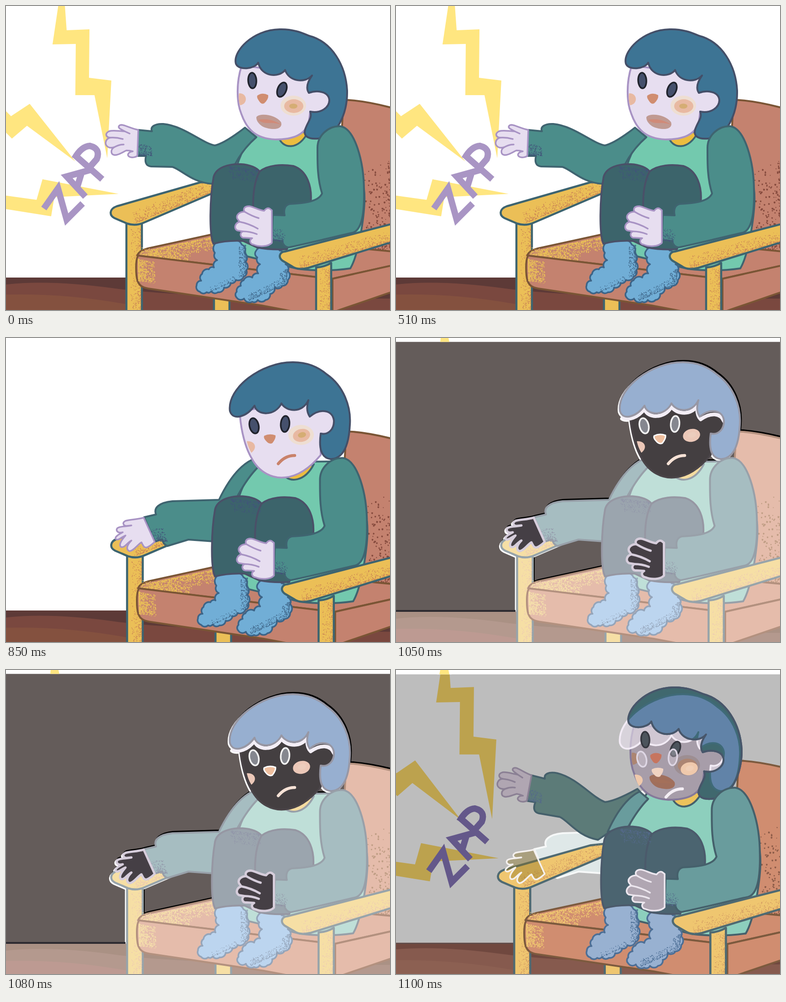
An HTML page that plays this animation: 842x665 px, repeating every 1.15 s.

```html
<!DOCTYPE html>
<html lang="en">
<head>
<meta charset="utf-8">
<title>Static shock</title>
<style>
html, body { margin: 0; width: 100%; height: 100%; overflow: hidden; background: #fff; }
svg { display: block; width: 842px; height: 665px; }
path, ellipse { stroke-linejoin: round; stroke-linecap: round; }

.plain {
  --floor: #7a483f; --band: #5d3a37; --grain: #84513f; --rust: #c4826f; --rustL: #7a5535;
  --wood: #ebbf57; --woodL: #3d6470; --mint: #73c9ae; --sleeve: #4b8d8a; --arm: #4b8d8a; --line: #3f6470;
  --knee: #3c646b; --kneeL: #4a5068; --sock: #71aed6; --sockL: #3d6487; --hair: #3d7494; --hairL: #444f68;
  --skin: #e7def0; --palm: #e7def0; --skinL: #a893c4; --palmL: #a893c4; --eye: #45506c; --eyeL: #20232c;
  --nose: #d08d70; --noseL: none; --cheek: #e8b9a2; --spot: #d5ad74; --halo: #f6dfb6;
  --mouth: #c09a92; --lip: #d08a78; --frown: #c9826a; --collar: #ecbc3f; --rim: none;
  --sw: #c98254; --sr: #eac057; --sb: #84493c; --sl: #41547a; --bolt: #ffe680; --zap: #a995c4;
}
.flash {
  --floor: #b4998e; --band: #aa9184; --grain: #bd9a92; --rust: #e5bcab; --rustL: #b3917f;
  --wood: #f6dfa5; --woodL: #98a4aa; --mint: #bfdfd8; --sleeve: #a6bdc1; --arm: #a6bdc1; --line: #98a0a9;
  --knee: #9ba5ae; --kneeL: #9697a3; --sock: #bcd5ef; --sockL: #95a5ba; --hair: #97afd0; --hairL: #9797a4;
  --skin: #443f41; --palm: #453f45; --skinL: #4a4448; --palmL: #d6cddb; --palmW: 5px; --eye: #85878f; --eyeL: #f2f2f2;
  --nose: #efbf9f; --noseL: #fff; --cheek: #ecc8b8; --spot: #eccdbd; --halo: none;
  --frown: #f7e2d6; --collar: #f5dca0; --rim: #f3eef6;
  --sw: #ecc9b2; --sr: #f5dfab; --sb: #bf9d84; --sl: #9297a9;
}
.mix {
  --floor: #865a4e; --band: #70483f; --grain: #8c6052; --rust: #d08d70; --rustL: #7c5a3e;
  --wood: #efc670; --woodL: #4f6a72; --mint: #8dcfbd; --sleeve: #699c9d; --arm: #5c7b78; --line: #45606b;
  --knee: #4b6470; --kneeL: #4b5a6b; --sock: #98b1d1; --sockL: #4d6f96; --hair: #40686e; --hairL: #47566a;
  --skin: #a79da9; --palm: #b0a6b2; --skinL: #85799a; --palmL: #8b8094; --eye: #4c545c; --eyeL: #35373f;
  --nose: #c6755f; --noseL: none; --cheek: #ac8572; --spot: #ac8572; --halo: #94807c;
  --mouth: #a06f5c; --lip: #a4705a; --collar: #ecc25c; --rim: none;
  --sw: #d29a62; --sr: #efc670; --sb: #8a5a47; --sl: #54698a; --bolt: #bca24e; --zap: #64588a;
}
.ghost {
  --eye: #ddd5e055; --eyeL: #ded6e4; --nose: #f0d3c2; --noseL: none; --palm: #8a701f66; --palmL: #f4f0ee;
  --cheek: #efc9ac; --spot: #f0cfb6; --halo: none; --frown: #f4eef4; --arm: #dfe8e8; --line: #f6f8f8;
}
.black { filter: brightness(0); }
.white { filter: brightness(0) invert(1); }

.floor { fill: var(--floor); } .band { fill: var(--band); } .grain { fill: var(--grain); }
.rust { fill: var(--rust); stroke: var(--rustL); stroke-width: 4; }
.wood { fill: var(--wood); stroke: var(--woodL); stroke-width: 4.5; }
.mint { fill: var(--mint); stroke: var(--line); stroke-width: 4; }
.sleeve { fill: var(--sleeve); stroke: var(--line); stroke-width: 4; }
.arm { fill: var(--arm); stroke: var(--line); stroke-width: 4; }
.knee { fill: var(--knee); stroke: var(--kneeL); stroke-width: 4; }
.sock { fill: var(--sock); stroke: var(--sockL); stroke-width: 3.5; }
.hair { fill: var(--hair); stroke: var(--hairL); stroke-width: 4; }
.face { fill: var(--skin); stroke: var(--skinL); stroke-width: 4; }
.palm { fill: var(--palm); stroke: var(--palmL); stroke-width: var(--palmW, 3.5px); }
.eye { fill: var(--eye); stroke: var(--eyeL); stroke-width: 3.5; }
.nose { fill: var(--nose); stroke: var(--noseL); stroke-width: 3; }
.cheek { fill: var(--cheek); } .spot { fill: var(--spot); } .halo { fill: var(--halo); opacity: .5; }
.mouth { fill: var(--mouth); } .lip { fill: var(--lip); }
.frown { fill: none; stroke: var(--frown); stroke-width: 6.5; }
.collar { fill: var(--collar); stroke: var(--line); stroke-width: 4; }
.rim { fill: none; stroke: var(--rim); stroke-width: 8; }
.sw { fill: var(--sw); } .sr { fill: var(--sr); } .sb { fill: var(--sb); }
.sl { fill: var(--sl); } .sk { fill: var(--sockL); }
.bolt { fill: var(--bolt); }
.zap { fill: none; stroke: var(--zap); stroke-width: 14; }
.zap path { stroke-linecap: butt; stroke-linejoin: miter; }
.inner { fill: none; }
</style>
</head>
<body>
<svg viewBox="0 0 842 665" role="img" aria-label="ZAP">
<defs>
  <g id="floor">
    <path class="floor" d="M-20 594H880V700H-20Z"/>
    <path class="band" d="M-20 594H880V640Q400 640 240 618T-20 612Z"/>
    <path class="grain" d="M-20 632Q120 626 262 652L300 700H-20Z"/>
  </g>

  <g id="back">
    <path class="rust" d="M740 205Q795 207 880 232V575H720Z"/>
    <path class="sb" data-spray="842,335,842,530,-56,30,170,3.2"/>
    <path class="sb" data-spray="842,548,768,562,0,-30,90,3"/>
  </g>

  <g id="chair">
    <path class="wood" d="M264 470H298V690H264ZM456 630H490V690H456Z"/>
    <path class="sw" data-spray="295,486,295,665,-22,0,330,1.6"/>
    <path class="wood" d="M243 438L425 386L480 380V398L302 474Q284 482 266 476L238 464C226 458 226 444 243 438Z"/>
    <path class="sw" data-spray="280,475,452,406,-4,-26,600,1.6"/>
    <path class="rust" d="M288 546C290 538 300 533 312 530L450 500L880 540V560L714 597Z"/>
    <path class="sr" data-spray="306,535,452,504,14,25,800,2"/>
    <path class="sr" data-spray="292,542,400,556,6,-14,260,2"/>
    <path class="rust" d="M290 546C283 555 285 590 288 600C292 612 300 616 312 618L560 655L640 670H716L880 614V560L714 597Z"/>
    <path class="rust inner" d="M716 597V680"/>
    <path class="sr" data-spray="289,552,290,600,36,7,520,2"/>
    <path class="mint" d="M548 272C520 310 490 350 480 520L530 548L640 575Q700 582 755 574C775 540 790 440 785 400L735 270Z"/>
  </g>

  <g id="front">
    <path class="sock" data-scallop="462,517 490,514 517,522 523,540 525,560 527,578 521,592 504,599 493,606 478,616 465,626 450,624 440,626 425,625 418,611 428,601 430,586 445,576 456,572 463,556 458,540"/>
    <path class="sk" data-spray="525,522,526,588,-16,5,220,1.7"/>
    <path class="sk" data-spray="448,624,506,598,-4,-9,70,1.6"/>
    <path class="sock" data-scallop="548,536 575,530 600,535 611,548 613,565 618,580 618,599 606,612 589,616 579,630 569,643 552,643 540,647 522,640 506,638 506,625 515,612 521,600 540,594 553,585 557,565 551,550"/>
    <path class="sk" data-spray="617,574,614,606,-16,5,100,1.7"/>
    <path class="sk" data-spray="532,644,604,611,-5,-13,180,1.7"/>
    <path class="knee" d="M455 520C445 500 447 420 455 375C460 352 490 345 515 346C535 347 550 354 556 362C575 347 605 346 630 350C660 360 672 395 668 432L660 440L616 532Q580 534 550 528L520 514Q485 512 455 520Z"/>
    <path class="knee inner" style="fill:none" d="M556 362Q541 390 542 440"/>
    <path class="sl" data-spray="488,350,552,358,2,28,260,1.6"/>
    <path class="sleeve" d="M683 310C683 285 705 262 733 263C765 268 785 340 785 405C786 455 780 490 760 496C715 506 660 520 620 528C612 528 606 520 606 514L583 512L585 457L611 458C608 445 612 435 622 433C645 432 685 430 693 410C682 375 683 340 683 310Z"/>
    <path class="sl" data-spray="586,511,612,516,-1,-26,110,1.6"/>
    <path class="palm" d="M583 447L578 443Q572 440 566 448C552 446 545 440 534 438C524 437 519 443 523 450C512 450 504 457 507 465L512 472C502 475 499 486 507 491L519 493C511 498 514 508 524 507L540 508C532 512 535 521 543 522C555 527 575 527 583 518Z"/>
    <path class="palm inner" d="M523 450Q540 460 554 464M512 472Q533 476 552 487M519 493Q535 493 550 499"/>
    <path class="wood" d="M612 537L880 468V506L662 573Q640 578 628 570L606 557C596 549 600 538 612 537Z"/>
    <path class="sw" data-spray="645,572,842,514,-4,-24,560,1.6"/>
    <path class="wood" d="M680 690V572Q698 571 713 562V690Z"/>
    <path class="sw" data-spray="710,572,710,665,-22,0,180,1.6"/>
  </g>

  <g id="armUp">
    <path class="arm" d="M524 266Q480 300 458 305C430 300 390 262 345 258C325 257 316 265 320 274L289 271L288 328L307 328C304 340 306 350 318 351L365 352C385 358 410 388 455 389L503 345Q520 312 549 287Z"/>
    <path class="sl" data-spray="291,325,320,327,-1,-24,170,1.6"/>
    <path class="palm" d="M290 271C275 268 262 261 254 260C246 260 245 266 251 269L260 274C248 274 235 271 226 274C216 279 219 287 228 288C217 291 215 305 225 309Q229 311 237 309C229 314 229 325 238 326C246 327 255 320 264 316Q272 316 278 318C268 319 264 327 271 330C277 333 285 330 288 328Z"/>
    <path class="palm inner" d="M260 274L271 279M228 288Q242 287 256 291M237 309Q248 303 258 303"/>
  </g>
  <path id="sleeveDown" class="arm" d="M540 266Q500 285 467 354L365 357C335 360 323 372 329 386L303 392L326 446L342 440Q345 452 354 455L400 441L470 446L508 345Q530 305 553 282Z"/>
  <path id="handDown" class="palm" d="M302 393C288 397 272 397 262 400C254 404 257 411 265 411L275 410C262 413 250 411 244 416C240 422 246 428 256 425C246 430 237 436 241 440C246 444 252 436 262 432C255 440 246 452 252 457C260 460 265 448 275 443C266 452 262 462 270 466C278 468 288 452 297 447C300 452 302 460 309 458C316 455 322 450 326 446Z"/>
  <g id="armDown">
    <use href="#sleeveDown"/>
    <path class="sl" data-spray="326,444,354,444,-10,-28,150,1.6"/>
    <use href="#handDown"/>
  </g>

  <g id="faceA">
    <path class="collar" d="M597 285C605 313 642 318 663 274Z"/>
    <path class="face" d="M517 130C505 165 505 210 516 236C528 270 548 290 590 292C630 292 655 282 664 255L667 231C690 236 709 222 709 206C708 188 685 183 664 190L672 150Z"/>
  </g>
  <path id="hairA" class="hair" d="M504 126C497 100 540 52 600 51C630 50 652 60 664 65C715 78 745 130 748 185C749 235 725 290 684 290C660 292 652 283 656 270C662 252 672 245 667 231C690 236 709 222 709 206C708 188 685 183 664 190C656 178 664 162 671 152C655 170 620 165 612 140C598 158 560 155 553 124C545 138 510 142 504 126Z"/>
  <g id="featA">
    <ellipse class="halo" cx="630" cy="218" rx="28" ry="22"/>
    <ellipse class="cheek" cx="631" cy="219" rx="21" ry="15"/>
    <ellipse class="spot" cx="630" cy="219" rx="9" ry="5.5"/>
    <path class="cheek" d="M511 191C530 190 531 215 513 217Q509 204 511 191Z"/>
    <ellipse class="eye" cx="540" cy="163" rx="9" ry="17" transform="rotate(-3 540 163)"/>
    <ellipse class="eye" cx="605" cy="183" rx="9.5" ry="16.5" transform="rotate(22 605 183)"/>
    <path class="nose" d="M551 196Q562 188 575 195Q576 204 566 213Q560 216 555 208Q549 200 551 196Z"/>
    <path class="mouth" d="M549 243C555 234 590 236 603 254C608 268 590 272 572 267C560 265 548 253 549 243Z"/>
    <path class="lip" d="M553 249Q580 244 604 260Q590 255 576 256T553 249Z"/>
  </g>

  <g id="faceB">
    <path class="collar" d="M608 299C622 317 655 315 675 276Z"/>
    <path class="face" d="M513 170C516 205 525 240 538 262C555 295 585 308 612 305C645 302 670 280 690 256V209C708 213 720 198 719 180C716 158 690 152 666 172L663 136L515 160Z"/>
    <path class="rim" d="M719 182C712 164 690 162 668 178Q658 168 661 146C650 170 615 168 604 150C590 178 550 176 545 155C530 176 508 180 498 174"/>
  </g>
  <path id="hairB" class="hair" d="M491 160C484 110 560 52 630 53C665 53 690 68 704 80C740 105 757 150 754 190C752 230 742 264 712 265C690 262 686 240 690 209C708 213 720 198 719 180C716 158 690 152 666 172C658 160 660 148 663 136C650 165 615 162 604 143C590 172 550 170 545 148C528 172 498 182 491 160Z"/>
  <g id="featB">
    <ellipse class="halo" cx="647" cy="212" rx="28" ry="22"/>
    <ellipse class="cheek" cx="648" cy="213" rx="19" ry="14" transform="rotate(-12 648 213)"/>
    <ellipse class="spot" cx="649" cy="212" rx="9" ry="6" transform="rotate(-12 649 212)"/>
    <path class="cheek" d="M528 226C545 224 553 240 538 251Q531 240 528 226Z"/>
    <ellipse class="eye" cx="544" cy="192" rx="10" ry="17" transform="rotate(-13 544 192)"/>
    <ellipse class="eye" cx="612" cy="188" rx="9.5" ry="17.5" transform="rotate(5 612 188)"/>
    <path class="nose" d="M566 214Q578 208 591 213Q592 220 584 230Q577 233 571 226Q564 219 566 214Z"/>
    <path class="frown" d="M597 275Q612 257 633 257"/>
  </g>

  <path id="bolt1" class="bolt" d="M119 -30H127L133 53L183 51L182 157L231 163L222 333L194 195H152L153 83L102 84Z"/>
  <path id="bolt2" class="bolt" d="M-20 210L11 241L52 214L152 340L46 262L13 290L-20 257Z"/>
  <path id="bolt3" class="bolt" d="M-20 412L67 424L80 379L247 411L106 418L99 460L-20 441Z"/>
  <g id="zap" class="zap">
    <path d="M83 443L114 399L133 467L168 432"/>
    <path d="M174 417L133 373L187 358M155 400L166 364"/>
    <path d="M211 379L153 328M150 334Q165 307 184 306Q208 312 199 335L184 352"/>
  </g>

  <clipPath id="hairClip"><use href="#hairA" transform="matrix(1.016 0 0 1.02 -2 -14)"/></clipPath>
</defs>

<g class="shot plain">
  <path fill="#fff" d="M0 0H842V665H0Z"/>
  <use href="#bolt1"/><use href="#bolt2"/><use href="#bolt3"/>
  <use href="#floor"/><use href="#back"/><use href="#chair"/>
  <use href="#zap"/><use href="#armUp"/>
  <use href="#faceA"/><use href="#hairA"/><use href="#featA"/>
  <use href="#front"/>
</g>

<g class="shot plain">
  <path fill="#fff" d="M0 0H842V665H0Z"/>
  <g transform="matrix(1.0095 0 0 1.008 -1 -2.5)"><use href="#floor"/><use href="#back"/><use href="#chair"/></g>
  <use href="#armDown"/><use href="#faceB"/><use href="#hairB"/><use href="#featB"/>
  <use href="#front" transform="matrix(1.0095 0 0 1.008 -1 -2.5)"/>
</g>

<g class="shot flash">
  <path fill="#645c5a" d="M0 0H842V665H0Z"/>
  <path fill="#fff" d="M0 0H842V8.5H0Z"/>
  <path fill="#ffe680" d="M98 0H115L117 8.5H97Z"/>
  <g class="black" transform="translate(2 -3)">
    <g transform="matrix(1.0095 0 0 1.008 -1 -2.5)"><use href="#back"/><use href="#chair"/></g>
    <use href="#armDown"/><use href="#hairB"/>
  </g>
  <g class="white" transform="translate(-2.5 2.5)">
    <use href="#chair" transform="matrix(1.0095 0 0 1.008 -1 -2.5)"/>
    <use href="#handDown"/><use href="#faceB"/><use href="#hairB"/>
  </g>
  <use href="#floor" transform="matrix(1.0095 0 0 1.008 -1 0)"/>
  <path fill="#2d2b30" d="M0 595H262V599H0Z"/>
  <g transform="matrix(1.0095 0 0 1.008 -1 -2.5)"><use href="#back"/><use href="#chair"/></g>
  <use href="#armDown"/><use href="#faceB"/><use href="#hairB"/><use href="#featB"/>
  <use href="#front" transform="matrix(1.0095 0 0 1.008 -1 -2.5)"/>
</g>

<g class="shot mix">
  <path fill="#bdbdbd" d="M0 0H842V665H0Z"/>
  <path fill="#fff" d="M0 0H842V9.5H0Z"/>
  <use href="#bolt1" transform="matrix(1.023 0 0 1.024 -16.3 -15)"/>
  <use href="#bolt2" transform="matrix(1 0 0 1.03 -10 -22.6)"/>
  <use href="#bolt3" transform="matrix(1.018 0 0 1.03 -26.5 -11.5)"/>
  <path fill="#fff" d="M90 0H122V9.5H90Z"/>
  <path fill="#ffe680" d="M97 0H115L117 9.5H95Z"/>
  <g transform="matrix(1.034 0 0 1.025 -13.8 -12)"><use href="#floor"/><use href="#back"/></g>
  <path fill="#5b4b49" d="M0 597H270V599H0Z"/>
  <use class="ghost" href="#sleeveDown"/>
  <use href="#chair" transform="matrix(1.034 0 0 1.025 -13.8 -12)"/>
  <use class="ghost" href="#handDown"/>
  <use href="#zap" x="-11" y="-3"/>
  <use href="#armUp" transform="translate(6 -6) rotate(8.5 524 262)"/>
  <path class="sleeve" d="M534 266Q495 285 464 354L508 345Q530 305 553 282Z"/>
  <use href="#faceA" transform="matrix(1.016 0 0 1.02 -2 -14)"/>
  <use href="#hairB" style="--hair:#ebe3f099;--hairL:#f2ebf5"/>
  <use href="#hairA" transform="matrix(1.016 0 0 1.02 -2 -14)"/>
  <g clip-path="url(#hairClip)"><use href="#hairB" style="--hair:#6183a8;--hairL:#3f6a78"/></g>
  <use href="#hairA" transform="matrix(1.016 0 0 1.02 -2 -14)" style="--hair:none"/>
  <use href="#featA" transform="matrix(1.016 0 0 1.02 -2 -14)"/>
  <use class="ghost" href="#featB" x="-5" y="3"/>
  <use href="#front" transform="matrix(1.034 0 0 1.025 -13.8 -12)" style="--palmL:#ece6ee"/>
</g>
</svg>

<script>
let seed = 7;
const rand = () => (seed = (seed * 16807) % 2147483647) / 2147483647;

// Grains start on an edge and thin out along (dx, dy).
function spray(x1, y1, x2, y2, dx, dy, count, size) {
  let d = '';
  for (let i = 0; i < count; i++) {
    const t = rand(), u = rand() ** 2, s = size * (0.5 + rand() * 0.7);
    const x = x1 + (x2 - x1) * t + dx * u, y = y1 + (y2 - y1) * t + dy * u;
    d += `M${x.toFixed(1)} ${y.toFixed(1)}l${s.toFixed(1)} ${(s * 0.3).toFixed(1)}l${(-s * 0.4).toFixed(1)} ${s.toFixed(1)}l${(-s * 0.8).toFixed(1)} ${(-s * 0.4).toFixed(1)}z`;
  }
  return d;
}

// Outward arcs between neighbouring points give the fluffy edge.
function scallop(points) {
  return points.map((p, i) => {
    const q = points[(i + 1) % points.length];
    const r = Math.hypot(q[0] - p[0], q[1] - p[1]) * 0.66;
    return `${i ? '' : 'M' + p}A${r} ${r} 0 0 1 ${q}`;
  }).join('') + 'Z';
}

for (const el of document.querySelectorAll('[data-spray]'))
  el.setAttribute('d', spray(...el.dataset.spray.split(',').map(Number)));
for (const el of document.querySelectorAll('[data-scallop]'))
  el.setAttribute('d', scallop(el.dataset.scallop.split(' ').map(p => p.split(',').map(Number))));

const LOOP = 1150, CUTS = [0, 850, 1050, 1100, LOOP];
document.querySelectorAll('.shot').forEach((shot, i) => {
  const steps = [];
  if (i) steps.push({ offset: 0, visibility: 'hidden' });
  steps.push({ offset: CUTS[i] / LOOP, visibility: 'visible' });
  if (CUTS[i + 1] < LOOP) steps.push({ offset: CUTS[i + 1] / LOOP, visibility: 'hidden' });
  steps.push({ offset: 1, visibility: i < 3 ? 'hidden' : 'visible' });
  for (const s of steps) s.easing = 'step-end';
  shot.animate(steps, { duration: LOOP, iterations: Infinity }).startTime = 0;
});
</script>
</body>
</html>
```
